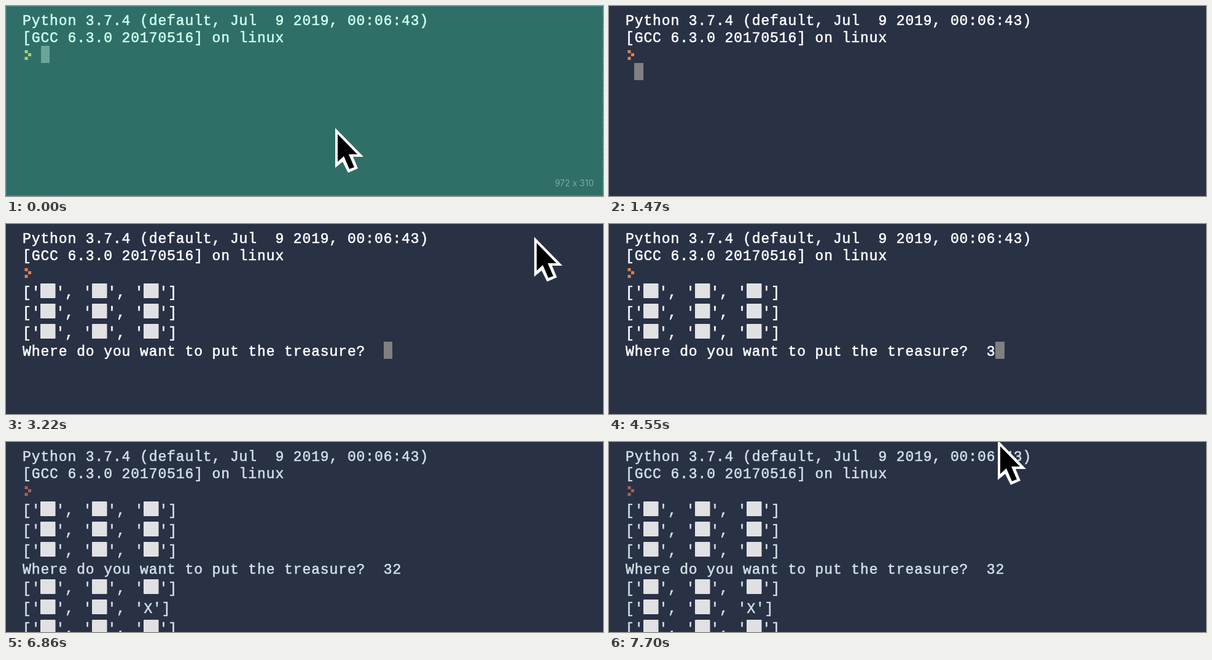
An HTML page with a canvas for the animation above (7.77 s loop, 972 by 310 pixels).

```html
<!DOCTYPE html>
<html lang="en">
<head>
<meta charset="utf-8">
<title>Treasure terminal</title>
<style>
  html, body { margin: 0; height: 100%; overflow: hidden; background: #293145; }
  canvas { display: block; }
</style>
</head>
<body>
<canvas width="972" height="310"></canvas>
<script>
const ctx = document.querySelector('canvas').getContext('2d');
const LOOP = 7770, STEP = 70;
const LEFT = 27, CHAR = 14.69, TILE = 25.24;
const FONT_SIZE = 23;

const DIM = { text: [208, 223, 228], prompt: [166, 99, 78] };
const LIVE = { text: [255, 255, 255], prompt: [222, 130, 75] };
const READY = [231, 197, 88];

const clamp = v => Math.max(0, Math.min(1, v));
const progress = (t, from, to) => clamp((t - from) / (to - from));
const ease = p => p * p * (3 - 2 * p);
const rgb = c => `rgb(${c.map(Math.round)})`;
const mix = (a, b, p) => rgb(a.map((v, i) => v + (b[i] - v) * p));

function rect(color, x, y, w, h) {
  ctx.fillStyle = color;
  ctx.fillRect(x, y, w, h);
}

function write(text, x, y, color) {
  ctx.font = `${FONT_SIZE}px "Liberation Mono", monospace`;
  ctx.letterSpacing = `${CHAR - FONT_SIZE * 0.6}px`;
  ctx.fillStyle = ctx.strokeStyle = color;
  ctx.lineWidth = 0.6;
  ctx.fillText(text, x, y);
  ctx.strokeText(text, x, y);
}

// '#' stands for a white tile, which is wider than a letter.
function row(pattern, y, color) {
  let x = LEFT;
  for (const part of pattern.split(/(#)/)) {
    if (part === '#') {
      ctx.fillStyle = '#e1e1e4';
      ctx.beginPath();
      ctx.roundRect(Math.floor(x), y - 22, 24.5, 24, 1);
      ctx.fill();
      x += TILE;
    } else {
      write(part, x, y, color);
      x += part.length * CHAR;
    }
  }
}

function grid(y, color, marked) {
  for (let i = 0; i < 3; i++)
    row(marked && i === 1 ? "['#', '#', 'X']" : "['#', '#', '#']", y + i * 33, color);
}

function prompt(color) {
  for (const [x, y] of [[30.5, 72], [36, 77], [30.5, 83]]) rect(color, x, y, 5, 5);
}

function polygon(color, points) {
  ctx.fillStyle = color;
  ctx.beginPath();
  for (const [x, y] of points) ctx.lineTo(x, y);
  ctx.fill();
}

function pointer(x, y) {
  ctx.save();
  ctx.translate(x, y);
  polygon('#fff', [[-1, -1], [-1, 64], [11, 54], [20, 72], [36, 65], [28, 46], [45, 46]]);
  polygon('#000', [[3, 9], [3, 54], [13, 45], [22, 66], [30, 63], [21, 42], [35, 42]]);
  ctx.restore();
}

function glide(t, from, to, a, b) {
  const p = ease(progress(t, from, to));
  pointer(a[0] + (b[0] - a[0]) * p, a[1] + (b[1] - a[1]) * p);
}

function drawPointer(t) {
  const corner = [955, -27], rest = [861, 22], side = [878, 22];
  if (t < 70) pointer(537, 200);
  else if (t >= 1890 && t < 2660) glide(t, 1890, 2310, [976, -80], corner);
  else if (t >= 2660 && t < 4200) glide(t, 2590, 3010, corner, rest);
  else if (t >= 4200 && t < 4480) glide(t, 4130, 4410, rest, side);
  else if (t >= 6930 && t < 7630) glide(t, 6930, 7420, side, [740, -78]);
  else if (t >= 7700) pointer(634, -2);
}

function drawCursor(t, color) {
  if (t >= 5250) return;
  let x = LEFT, y = 220;
  if (t < 1050) [x, y] = [57, 65];
  else if (t < 1540) [x, y] = [LEFT + CHAR, 93];
  else if (t < 5040) [x, y] = [615 + (t >= 4480) * CHAR + (t >= 4690) * CHAR, 192];
  const left = Math.floor(x);
  rect(color, left, y, Math.floor(x + CHAR) - left, 28);
}

function drawEdges(selecting) {
  if (selecting) {
    ctx.strokeStyle = '#46877d';
    ctx.lineWidth = 1;
    ctx.strokeRect(0.5, 0.5, 971, 309);
  }
  for (let y = 0; y < 310; y += 8) rect(selecting ? '#2f6f67' : '#202a3c', 971, y, 1, 4);
}

function draw(t) {
  const selecting = t < 70;
  const fade = progress(t, 5180, 5600);
  const color = selecting ? '#ceffef' : mix(LIVE.text, DIM.text, fade);

  rect(selecting ? '#2f6f67' : '#293145', 0, 0, 972, 310);
  drawEdges(selecting);

  write('Python 3.7.4 (default, Jul  9 2019, 00:06:43)', LEFT, 31, color);
  write('[GCC 6.3.0 20170516] on linux', LEFT, 59, color);
  if (selecting) prompt('#a9d076');
  else if (t < 1400) prompt(mix(READY, LIVE.prompt, progress(t, 1050, 1400)));
  else prompt(mix(LIVE.prompt, DIM.prompt, fade));

  if (t >= 1540) {
    grid(119, color);
    const answer = '32'.slice(0, (t >= 4480) + (t >= 4690));
    write('Where do you want to put the treasure?  ' + answer, LEFT, 214.5, color);
  }
  if (t >= 5250) grid(246, color, true);

  drawCursor(t, selecting ? '#6aa597' : '#808080');
  if (selecting) {
    ctx.font = '14px Inter, "Liberation Sans", sans-serif';
    ctx.letterSpacing = '0px';
    ctx.textAlign = 'right';
    ctx.fillStyle = '#80aaa3';
    ctx.fillText('972 x 310', 957, 294);
    ctx.textAlign = 'left';
  }
  drawPointer(t);
}

const start = performance.now();
function tick() {
  const t = (performance.now() - start) % LOOP;
  draw(Math.floor(t / STEP) * STEP);
  requestAnimationFrame(tick);
}
tick();
</script>
</body>
</html>
```
